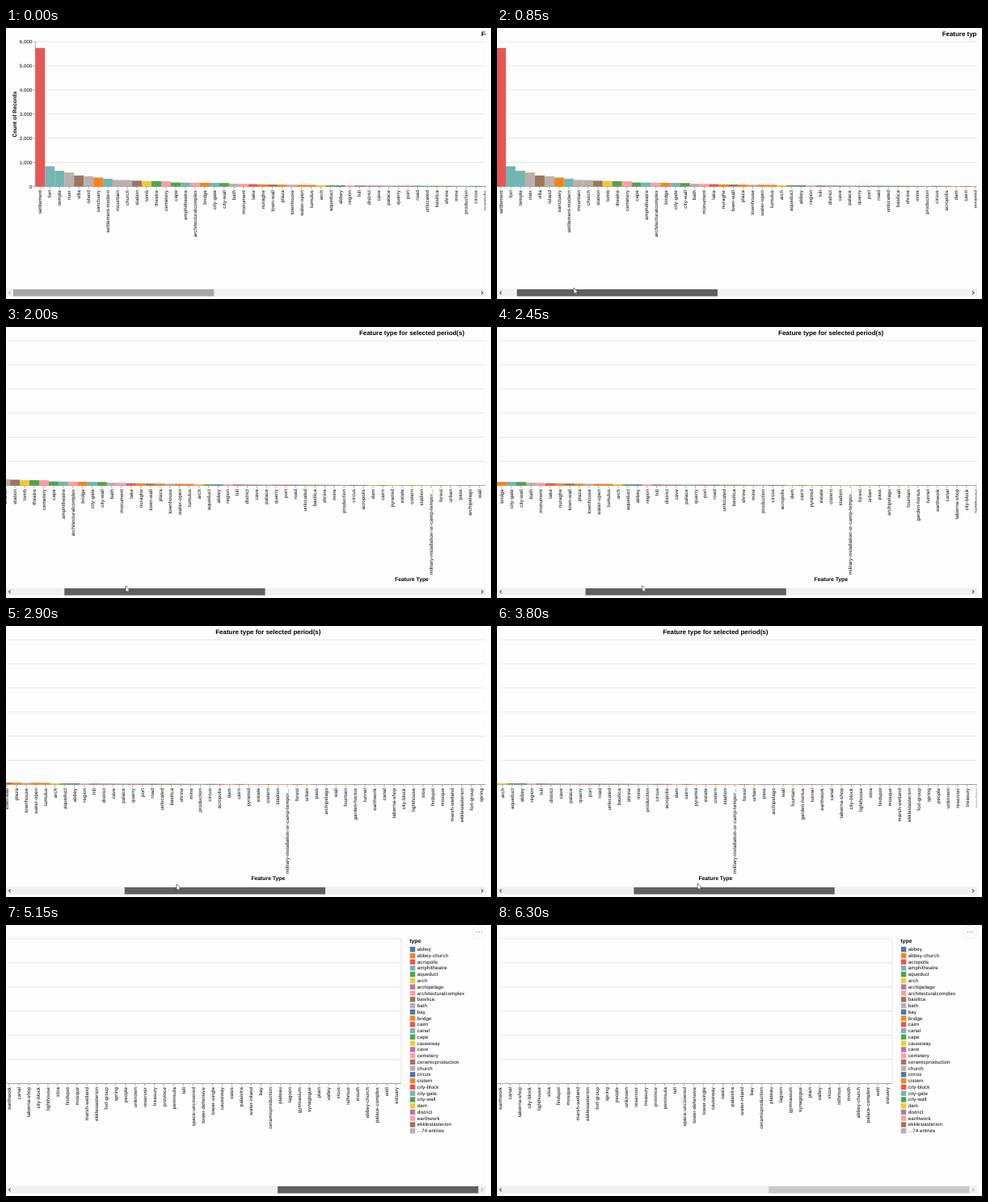
An HTML page for the animation above (6350 ms loop, 600 by 336 pixels).

```html
<!DOCTYPE html>
<html lang="en">
<head>
<meta charset="utf-8">
<title>Feature types</title>
<style>
  @property --scroll { syntax: "<number>"; inherits: true; initial-value: 0; }
  html, body { margin: 0; width: 100%; height: 100%; overflow: hidden; background: #fff; }
  svg {
    display: block; width: 600px; height: 336px;
    font: 6.1px "Liberation Sans", Arial, sans-serif;
    text-rendering: geometricPrecision;
    animation: scroll 6350ms -1ms infinite;
  }
  text { fill: #000; letter-spacing: .12px; }
  .bold { font-weight: bold; font-size: 6.8px; letter-spacing: 0; }
  .title { font-size: 7.95px; }
  .mid { text-anchor: middle; }
  .end { text-anchor: end; }
  #chart { transform: translateX(calc(var(--scroll) * -1px)); }
  #thumb {
    transform: translateX(calc(var(--scroll) * .4189px));
    animation: grip 6350ms -1ms step-end infinite;
  }
  #cursor { animation: cursor 6350ms -1ms infinite; }
  .arrow { fill: none; stroke: #555; stroke-width: 1.1; }
  #back { animation: back 6350ms -1ms step-end infinite; }
  #next { animation: next 6350ms -1ms step-end infinite; }

  @keyframes scroll {
    0% { --scroll: 0; animation-timing-function: step-end; }
    4.7244% { --scroll: 0; animation-timing-function: steps(23); }
    22.8346% { --scroll: 78; animation-timing-function: steps(11); }
    31.4961% { --scroll: 151; animation-timing-function: steps(18); }
    45.6693% { --scroll: 328.7; animation-timing-function: steps(18); }
    59.8425% { --scroll: 382.7; animation-timing-function: steps(16); }
    72.4409% { --scroll: 567.8; animation-timing-function: steps(10); }
    80.315%, 100% { --scroll: 780.7; }
  }
  @keyframes cursor {
    0% { transform: translate(79px, 322px); opacity: 0; animation-timing-function: step-end; }
    .7874% { transform: translate(79px, 322px); opacity: 1; animation-timing-function: step-end; }
    4.7244% { transform: translate(79px, 322px); opacity: 1; animation-timing-function: steps(23); }
    22.8346% { transform: translate(112px, 322px); animation-timing-function: steps(11); }
    31.4961% { transform: translate(148px, 321px); animation-timing-function: steps(18); }
    45.6693% { transform: translate(211px, 320px); animation-timing-function: steps(18); }
    59.8425% { transform: translate(248px, 319px); animation-timing-function: steps(16); }
    72.4409% { transform: translate(420.5px, 319px); opacity: 1; animation-timing-function: steps(11); }
    81.1024% { transform: translate(452px, 337px); opacity: 1; animation-timing-function: step-end; }
    82%, 100% { transform: translate(452px, 337px); opacity: 0; }
  }
  @keyframes grip {
    0% { fill: #a6a6a6; }
    3.937% { fill: #606060; }
    82.6772%, 100% { fill: #c9c9c9; }
  }
  @keyframes back { 0% { stroke: #bbb; } 4.7244%, 100% { stroke: #555; } }
  @keyframes next { 0% { stroke: #555; } 80.315%, 100% { stroke: #bbb; } }
</style>
</head>
<body>
<svg viewBox="0 0 600 336">
  <clipPath id="view"><rect width="593.5" height="333"/></clipPath>
  <rect width="594" height="333" fill="#fdfdfd"/>
  <g clip-path="url(#view)"><g id="chart"></g></g>
  <rect y="323.5" width="594" height="9.5" fill="#f0f0f0"/>
  <rect id="thumb" x="9" y="324" width="248.3" height="8.6"/>
  <path id="back" class="arrow" d="M5.6 326.3L3.6 328.3L5.6 330.3"/>
  <path id="next" class="arrow" d="M588 326.3L590 328.3L588 330.3"/>
  <path id="cursor" d="M0 0V7.8L1.8 6.2L3 8.9L4.3 8.3L3.1 5.7H5.5Z" fill="#fff" stroke="#222" stroke-width=".6"/>
</svg>
<script type="module">
const names = `settlement fort temple river villa island sanctuary settlement-modern mountain church
  station tomb theatre cemetery cape amphitheatre architecturalcomplex bridge city-gate city-wall
  bath monument lake nuraghe town-wall plaza townhouse water-open tumulus arch aqueduct abbey region
  hill district cave palace quarry port road unlocated basilica shrine mine production circus
  acropolis dam cairn pyramid estate cistern stadion military-installation-or-camp-tempor… forest
  urban pass archipelago wall fountain garden-hortus tunnel earthwork canal taberna-shop city-block
  lighthouse stoa findspot mosque marsh-wetland ekklesiasterion fort-group spring people unknown
  reservoir treasury province peninsula tell space-uncovered tower-defensive tower-single causeway
  oasis palaistra water-inland bay ceramicproduction plateau lagoon gymnasium synagogue plain valley
  vicus isthmus mouth abbey-church palace-complex well estuary`.split(/\s+/);
const counts = [5740, 840, 650, 580, 455, 425, 370, 322, 272, 265, 240, 228, 222, 216, 165, 160, 156,
  151, 148, 145, 115, 110, 95, 86, 80, 77, 72, 70, 67];
const palette = ["#4c78a8", "#f58518", "#e45756", "#72b7b2", "#54a24b",
  "#eeca3b", "#b279a2", "#ff9da6", "#9d755d", "#bab0ac"];
const sorted = [...names].sort();
const color = i => palette[i % 10];

const left = 36.3, ceiling = 17, base = 196.5, step = 11.975;
const right = left + step * names.length, middle = (left + right) / 2;
const scaleY = (base - ceiling) / 6000;

const chart = document.getElementById("chart");
function add(tag, attrs, content = "") {
  const el = document.createElementNS("http://www.w3.org/2000/svg", tag);
  for (const key in attrs) el.setAttribute(key, attrs[key]);
  el.textContent = content;
  chart.append(el);
}
const line = (x1, y1, x2, y2, stroke) => add("line", { x1, y1, x2, y2, stroke, "stroke-width": .7 });
const rect = (x, y, width, height, fill) => add("rect", { x, y, width, height, fill });
const label = (x, y, content, cls = "") => add("text", { x, y, class: cls }, content);
const upright = (x, y, content, cls) =>
  add("text", { transform: `translate(${x} ${y}) rotate(-90)`, class: cls }, content);

// grid and vertical axis
for (let value = 0; value <= 6000; value += 1000) {
  const y = base - value * scaleY;
  line(left, y, right, y, "#ddd");
  line(left - 3, y, left, y, "#888");
  label(32.6, y + 2.1, value.toLocaleString("en-US"), "end");
}
line(right, ceiling, right, base, "#ddd");
line(left, ceiling, left, base, "#888");
line(left, base, right, base, "#888");
upright(13.2, 107, "Count of Records", "bold mid");

// bars and horizontal axis
names.forEach((name, i) => {
  const x = left + i * step, center = x + step / 2;
  const height = (counts[i] ?? 50 * .95 ** (i - 29)) * scaleY;
  line(center, base, center, base + 3, "#888");
  rect(x, base - height, step, height, color(sorted.indexOf(name)));
  upright(center + 2, 201, name, "end");
});
label(middle, 10, "Feature type for selected period(s)", "bold title mid");
label(middle, 314.5, "Feature Type", "bold mid");

// legend
const legendX = 1280.7;
label(legendX - .8, 22.4, "type", "bold");
[...sorted.slice(0, 29), "...74 entries"].forEach((name, i) => {
  const y = 30.2 + i * 7.76;
  rect(legendX - .2, y - 3.2, 6.4, 6.4, color(i));
  label(legendX + 8.8, y + 2, name);
});

// menu button
const menuX = 1366;
add("circle", { cx: menuX, cy: 9, r: 8, fill: "#fdfdfd", stroke: "#e8e8e8", "stroke-width": .7 });
for (const dx of [-3.3, 0, 3.3]) add("circle", { cx: menuX + dx, cy: 9, r: 1, fill: "#c4c4c4" });
</script>
</body>
</html>
```
